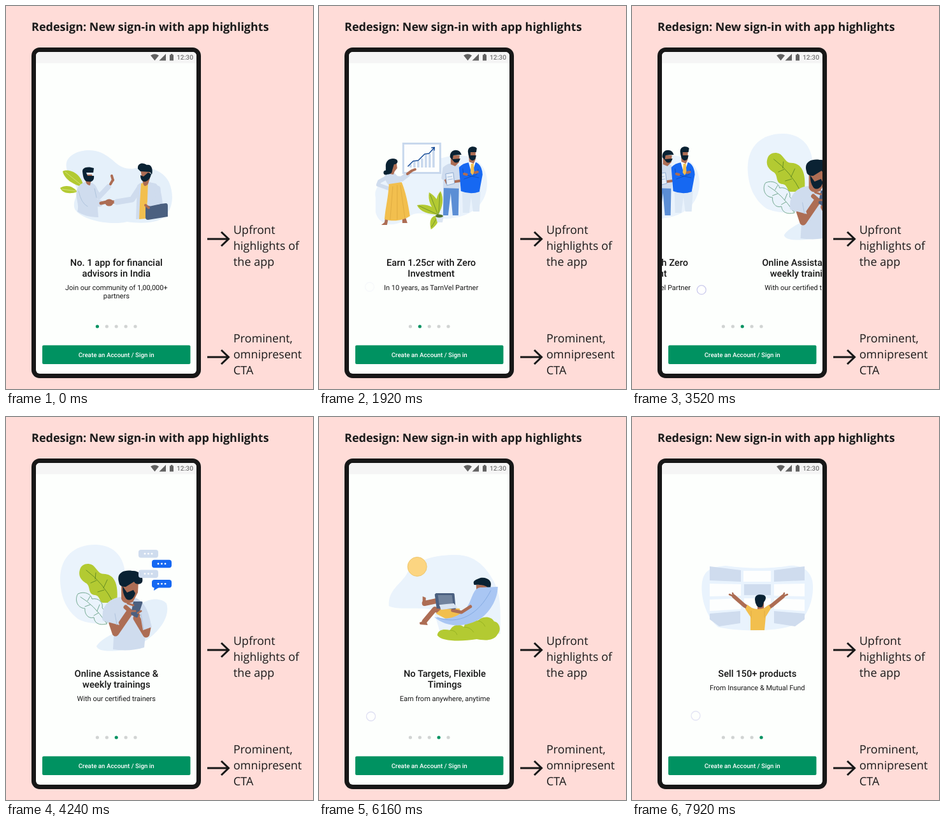
An HTML page for the animation above (8000 ms loop, 482x600 px).

```html
<!DOCTYPE html>
<html lang="en">
<head>
<meta charset="utf-8">
<title>Sign-in with app highlights</title>
<style>
html, body { margin: 0; width: 100%; height: 100%; overflow: hidden; background: #ffdcd8; }
svg { display: block; width: 482px; height: 600px; text-rendering: geometricPrecision; }
.note { font: 18px "Open Sans", sans-serif; fill: #1b1b1b; }
.title { font-weight: 700; }
.head, .sub, .cta, .clock { font-family: Roboto, sans-serif; text-anchor: middle; fill: #161616; }
.head { font-size: 14.7px; font-weight: 500; }
.sub { font-size: 11px; }
.cta { font-size: 9.75px; font-weight: 500; fill: #fff; }
.clock { font-size: 10.3px; font-weight: 500; fill: #757575; }
.blob { fill: #eaf3fc; }
.pale { fill: #cfdcee; }
.dark { fill: #0a2233; }
.skin { fill: #ad6d54; }
.gold { fill: #f2bf4e; }
.leaf { fill: #b3ca32; }
.blue { fill: #1668f2; }
.white { fill: #fdfefe; }
.slate { fill: #4b6080; }
.line { fill: none; stroke-linecap: round; stroke-linejoin: round; }
.limb { stroke: #ad6d54; }
.sleeve { stroke: #cfdcee; }
</style>
</head>
<body>
<svg viewBox="0 0 482 600">
  <defs><clipPath id="screen"><rect x="47" y="72" width="252" height="504" rx="6"/></clipPath></defs>
  <rect width="482" height="600" fill="#ffdcd8"/>
  <text class="note title" x="40" y="39">Redesign: New sign-in with app highlights</text>
  <g id="notes"></g>
  <rect x="40" y="65" width="266" height="518" rx="13" fill="#171717"/>
  <g clip-path="url(#screen)">
    <rect x="47" y="72" width="252" height="504" fill="#fdfffd"/>
    <rect x="47" y="72" width="252" height="17.5" fill="#f5f5f5"/>
    <g fill="#616161">
      <path d="M227 77.5Q233.500 73 240 77.500L233.500 85.500Z"/>
      <path d="M251 75V85.500H240.500Z"/>
      <path d="M257 76.500h1.800v-1.500h2.600v1.500H263V85.500h-6Z"/>
    </g>
    <text class="clock" x="281" y="84">12:30</text>

    <g class="slide"><g>
      <path class="blob" style="fill:#e5f0fa" d="M95 245C100 228 130 221 150 230C174 242 174 255 198 255C222 250 246 256 256 276C265 298 261 318 249 330C237 341 210 341 190 338C168 344 119 337 108 318C103 304 116 296 110 283C104 270 92 259 95 245Z"/>
      <path class="leaf" d="M89 259C99 254 119 262 122 284C106 280 92 272 89 259ZM85 285C94 279 106 282 112 291C101 295 89 294 85 285Z"/>
      <path class="line" stroke="#dce789" stroke-width=".8" d="M93 260L119 281M88 287L110 290"/>
      <path class="pale" d="M111 289C114 279 123 274 132 276C143 279 146 289 143 303L145 331C131 331 119 327 112 322C116 311 108 300 111 289Z"/>
      <path class="skin" d="M124 264h11l1 7-3 5-1 5q-6 0-7-7Z"/>
      <path class="dark" d="M120 259C120 252 130 251 138 254L137 261L126 261L128 266L138 266C139 274 134 276 130 275C122 276 121 267 120 259Z"/>
      <path class="line sleeve" stroke-width="8" d="M139 288L146 299L161 283"/>
      <path class="line limb" stroke-width="4" d="M164 279L168 272M166 266L168 273"/>
      <path class="line sleeve" stroke-width="11" d="M119 288L127 307L147 309"/>
      <path class="line" stroke="#a8bed9" stroke-width=".8" d="M114 290Q118 309 128 314M139 286L142 300"/>
      <path class="line limb" stroke-width="5" d="M149 309L158 307L169 307"/>
      <ellipse class="skin" cx="162" cy="308" rx="6.500" ry="5.500"/>
      <path class="line sleeve" stroke-width="9" d="M174 307L198 303L211 283"/>
      <path class="pale" d="M206 281Q212 275 220 275L235 278Q244 285 246 311L241 331L204 334Z"/>
      <path class="gold" d="M212 278L223 275L221 333L209 334Q210 305 212 278Z"/>
      <path class="skin" d="M211 256h15v14l-3 9q-6 7-8-2Z"/>
      <path class="dark" d="M207 255C206 245 216 245 221 249C229 247 231 257 229 264L226 260L211 259Z"/>
      <path class="dark" d="M211 265L216 267L223 261L228 263C227 271 221 276 216 275Q211 273 211 265Z"/>
      <path class="slate" d="M219 313L251 309Q254 309 254 313V330L223 335Q219 335 219 331Z"/>
      <path class="line sleeve" stroke-width="9" d="M238 286L240 306L226 309"/>
      <path class="line limb" stroke-width="4" d="M219 312L224 316"/>
    </g></g>

    <g class="slide"><g transform="translate(6)">
      <path class="blob" d="M80 300C76 283 94 269 111 270C144 259 153 241 185 238C224 226 254 242 255 274C257 309 231 329 201 332C177 339 158 317 135 328C113 350 85 345 80 323Z"/>
      <rect x="123.500" y="215.500" width="58" height="46" fill="#fdfefe" stroke="#c8d8ed" stroke-width="3"/>
      <path stroke="#c8d8ed" stroke-width="3.500" d="M135 253v-5M141 253v-9M147 253v-10M153 253v-14M159 253v-20M165 253v-21M171 253v-28"/>
      <path class="line" stroke="#174c98" stroke-width="1.500" d="M131 251L139 243L147 242L157 232L164 231L172 222M168 222L172.500 221.500L172 226"/>
      <path class="line sleeve" stroke-width="8" d="M109 270L121 271L130 264"/>
      <path class="line limb" stroke-width="4" d="M130 263L137 258L142 256"/>
      <path class="pale" d="M94 267Q99 259 110 262L118 270L120 279L102 282Q96 277 94 267Z"/>
      <path class="line sleeve" stroke-width="6" d="M97 269L86 275L84 280L101 286"/>
      <path class="skin" d="M102 246h11l1 8-4 5-2 5-6-1Z"/>
      <path class="dark" d="M96 252C95 241 105 237 112 240C117 243 114 248 109 248L106 258C106 264 98 265 96 262Z"/>
      <circle class="dark" cx="96" cy="261" r="3.500"/>
      <path class="skin" d="M95 333h5l-2 10h-9l5-4ZM122 331h5l3 9h-8Z"/>
      <path class="gold" d="M101 279L121 276C127 290 131 309 134 329C122 337 106 338 94 334C96 313 100 299 101 279Z"/>
      <path class="line" stroke="#d8a53d" stroke-width=".7" d="M107 283L103 334M114 281L114 334M119 281L126 332"/>
      <path fill="#5b8ed5" d="M187 279H211L210 328H201L198 293L194 328H186Z"/>
      <path class="pale" d="M186 253Q193 245 206 246L214 252L212 286L186 285Z"/>
      <path class="skin" d="M198 234h14l-1 11-6 6-7-3Z"/>
      <path class="dark" d="M197 237C196 225 208 223 213 229L215 233L202 234L201 240L213 239Q211 247 204 245Z"/>
      <path class="line limb" stroke-width="4" d="M188 268L192 277L212 274"/>
      <path class="line sleeve" stroke-width="7" d="M189 255L187 269"/>
      <path fill="#e8f0fa" stroke="#8fadd3" d="M190 263L202 261L204 278L192 281Z"/>
      <path class="line" stroke="#8fadd3" stroke-width=".8" d="M193 268l7-1M194 272l7-1"/>
      <path fill="#dce8f5" d="M216 289H245L243 322H233L230 299L227 324H217Z"/>
      <path class="blue" d="M211 253Q217 246 227 245H238Q247 249 248 264L243 291Q229 296 214 290Z"/>
      <path class="white" d="M226 245h11l-6 18Z"/>
      <path class="gold" d="M230 247h4l1 14-3 4-3-4Z"/>
      <path class="skin" d="M226 227h11v13l-3 7-7-3Z"/>
      <path class="dark" d="M225 228C225 218 237 219 239 223L238 229L229 229L229 234L238 234Q237 243 231 242Q226 240 225 228Z"/>
      <path class="line" stroke="#0d50c2" stroke-width="1" d="M217 255L218 264L242 269M241 256L239 264L219 271"/>
      <path class="line limb" stroke-width="4" d="M219 263l4 1M236 261l4-1"/>
      <path class="leaf" d="M179 327C163 326 150 323 145 312C160 309 174 314 179 327ZM179 325C166 317 162 304 164 292C176 299 183 310 179 325ZM179 326C173 312 174 299 182 290C188 302 185 315 179 326ZM179 328C166 328 164 337 167 350C176 344 180 337 179 328Z"/>
      <path class="line" stroke="#64862b" stroke-width=".8" d="M148 313L178 327L166 296M181 294L179 327L168 346"/>
      <path fill="#dce6f2" d="M174 329h13l-2 10h-8Z"/>
      <ellipse cx="180" cy="329" rx="6" ry="2.500" fill="#55752c"/>
    </g></g>

    <g class="slide"><g transform="translate(62)">
      <path class="blob" d="M23 256C22 218 47 199 80 200C108 201 125 220 125 250L121 312C101 327 71 326 52 317C34 304 24 284 23 256Z"/>
      <path class="blob" style="fill:#e5f0fa" d="M80 359C92 340 124 339 136 310C147 286 177 279 190 292C199 320 161 358 123 365Q83 370 80 359Z"/>
      <path class="leaf" d="M54 239C57 228 72 227 78 236C84 243 85 246 94 246C109 248 115 263 112 291H91C84 291 87 281 78 279C65 278 72 264 63 260Q50 252 54 239Z"/>
      <path class="line" stroke="#55811f" stroke-width=".8" d="M64 240Q91 260 107 292M78 254l1-10M80 256l-9 4M91 268l6-13M92 271l-10 3"/>
      <path class="line" stroke="#72a890" stroke-width="1" d="M96 324C84 327 77 323 76 314C66 317 61 307 62 300C48 299 46 284 51 277C62 272 72 278 73 285C84 283 91 291 89 299Q100 308 96 324ZM55 282Q76 294 95 322M66 288l4-7M70 294l-8 3M81 304l4-10M83 307l-7 4"/>
      <path class="pale" d="M90 306C92 290 108 282 120 282H137C154 286 162 302 166 327L157 340L155 361Q132 368 106 364L108 328L89 317Z"/>
      <path class="skin" d="M119 258h27l-1 17-8 15q-14 5-18-5Z"/>
      <path class="dark" d="M115 258C111 243 125 239 136 241C147 240 154 249 152 258C151 262 142 264 139 258L126 266Q116 267 115 258Z"/>
      <path class="dark" d="M121 265L128 275L138 271L141 276C139 285 131 290 126 284Q121 277 121 265Z"/>
      <path class="line limb" stroke-width="11" d="M105 323L110 338L132 306"/>
      <path class="line limb" stroke-width="11" d="M160 330L158 340L143 315"/>
      <path class="pale" d="M90 305Q95 294 106 294L116 326L90 319ZM146 294Q158 297 167 329L153 334Z"/>
      <path class="line" stroke="#a7bdd9" stroke-width=".8" d="M109 308L112 325M150 309L154 333"/>
      <path class="line limb" stroke-width="7" d="M126 298L135 306L145 311"/>
      <path class="slate" d="M138 289h13q2 0 1 3l-7 21q-1 2-3 1l-8-5Z"/>
      <path class="line limb" stroke-width="3" d="M129 292L138 295M134 304L141 304M145 307L150 304"/>
      <g id="chat"></g>
      <path class="blue" d="M171 266L170 272L178 267Z"/>
    </g></g>

    <g class="slide"><g transform="translate(-24.500)">
      <path class="blob" d="M110 291C111 269 132 259 139 244C154 222 185 216 215 216C247 216 264 237 276 260C287 282 285 309 285 340L190 336L180 302C156 297 122 303 110 296Z"/>
      <circle cx="154.500" cy="234.500" r="15" fill="#fcd581" stroke="#efc66a"/>
      <path class="leaf" d="M186 342C187 332 198 332 206 334C211 324 222 324 228 329C230 316 244 318 250 319C257 311 271 312 275 320C284 322 287 333 281 340C275 352 258 350 248 348C224 352 193 352 186 342Z"/>
      <path class="line" stroke="#95b021" stroke-width=".9" d="M206 334Q215 334 217 341M228 329Q238 329 243 337M250 319Q258 321 261 328"/>
      <path class="skin" d="M247 263h21l-5 15-15 3Z"/>
      <path class="dark" d="M244 263C240 256 249 254 254 252C264 250 272 257 270 264L269 270Q261 261 244 263Z"/>
      <path class="line limb" stroke-width="8" d="M209 306L185 288L166 292M205 311L182 301L166 320"/>
      <path class="skin" d="M168 283l-5-2v13l5 1ZM168 318l-10 4 1 3 12 1Z"/>
      <path class="gold" d="M194 299L221 300L225 316L201 317L184 308Z"/>
      <path d="M181 313C202 320 226 313 236 292C243 277 244 266 257 267L281 266C281 283 271 303 255 315C234 329 202 332 181 313Z" fill="#a9c6f3"/>
      <path class="line" stroke="#82a8e0" stroke-width=".9" d="M186 314C219 326 250 311 270 272"/>
      <path class="line limb" stroke-width="5" d="M238 297L224 306L210 303"/>
      <path class="slate" d="M184 276h27q2 0 2 2l2 23-30-1-3-22Z"/>
      <path fill="#71839d" d="M187 279h22l2 15-22-1Z"/>
      <path fill="#d9e4f1" d="M189 294L212 292L218 299L192 302Z"/>
    </g></g>

    <g class="slide"><g transform="translate(-23.500)">
      <path class="blob" style="fill:#e9f3fd" d="M110 259C113 241 123 235 147 233C184 238 216 238 247 233C272 231 284 246 284 265C285 287 276 308 263 323C231 337 170 337 135 329C117 314 107 283 110 259Z"/>
      <path class="pale" d="M122 234L171 240V258L122 256ZM271 234L223 240V258L271 256ZM176 262h42v17h-42ZM122 308L170 304V323L137 328L122 317ZM271 308L223 304V323L256 328L271 317Z"/>
      <path class="white" d="M175 241h43v17h-43ZM122 261L171 262V280L122 281ZM271 261L223 262V280L271 281ZM122 286L171 284V301L122 304ZM271 286L223 284V301L271 304ZM176 284h42v17h-42Z"/>
      <path class="line limb" stroke-width="6" d="M188 303L176 295L160 281M208 303L220 295L237 281"/>
      <path class="line limb" stroke-width="2.500" d="M162 282L153 278M160 281L158 276M235 282L244 278M237 281L239 276"/>
      <path class="skin" d="M197 289h10v12h-10Z"/>
      <path class="gold" d="M181 294L188 299Q198 303 208 299L215 294L218 300L210 313L208 334H186L186 313L178 301Z"/>
      <path class="line" stroke="#d9a742" stroke-width=".7" d="M187 304L187 314M208 304L208 314"/>
      <path class="dark" d="M193 286C193 277 202 278 207 279C212 281 210 287 207 290L205 297Q200 300 196 296Q193 291 193 286Z"/>
    </g></g>

    <g id="dots"></g>
    <rect x="57" y="531.500" width="232.500" height="29.500" rx="2" fill="#009261"/>
    <text class="cta" x="173.200" y="550">Create an Account / Sign in</text>
    <circle id="touch" r="7" fill="#fff" fill-opacity=".75" stroke="#cbcbec" stroke-width="1.300"/>
  </g>
</svg>
<script>
const NS = "http://www.w3.org/2000/svg";
const PAGE = 252, LOOP = 8000, LAST = 7920, SETTLE = 400, GRIP_X = 264.5;
const $ = id => document.getElementById(id);

function add(parent, tag, attrs, text = "") {
  const node = document.createElementNS(NS, tag);
  for (const key in attrs) node.setAttribute(key, attrs[key]);
  node.textContent = text;
  parent.appendChild(node);
  return node;
}

function addNote(y, lines) {
  lines.forEach((line, i) => add($("notes"), "text", { class: "note", x: 357, y: y + 25 * i }, line));
  add($("notes"), "path", {
    d: `M316 ${y + 8}H349M338 ${y - 3}L349.5 ${y + 8}L338 ${y + 19}`,
    fill: "none", stroke: "#171717", "stroke-width": 3
  });
}
addNote(357, ["Upfront", "highlights of", "the app"]);
addNote(527, ["Prominent,", "omnipresent", "CTA"].map(s => s));
// The lower arrow sits one line further down its note.
$("notes").lastChild.setAttribute("transform", "translate(0 15)");

const captions = [
  [["No. 1 app for financial", "advisors in India"], ["Join our community of 1,00,000+", "partners"]],
  [["Earn 1.25cr with Zero", "Investment"], ["In 10 years, as TarnVel Partner"]],
  [["Online Assistance &", "weekly trainings"], ["With our certified trainers"]],
  [["No Targets, Flexible", "Timings"], ["Earn from anywhere, anytime"]],
  [["Sell 150+ products"], ["From Insurance & Mutual Fund"]]
];
const slides = [...document.querySelectorAll(".slide")];
slides.forEach((slide, i) => {
  const [head, sub] = captions[i];
  head.forEach((s, k) => add(slide, "text", { class: "head", x: 173.3, y: 407 + 17.3 * k }, s));
  const top = 410.7 + 17.3 * head.length;
  sub.forEach((s, k) => add(slide, "text", { class: "sub", x: 173.3, y: top + 13 * k }, s));
});

for (let i = 0; i < 4; i++) {
  const x = i % 2 ? 167 : 146, y = 208 + 15.7 * i;
  add($("chat"), "rect", { class: i % 2 ? "blue" : "pale", x, y, width: 31, height: 12.5, rx: 4 });
  for (let k = 0; k < 3; k++)
    add($("chat"), "circle", { class: "white", cx: x + 10 + 5.5 * k, cy: y + 6.2, r: 1.4 });
}

const dots = slides.map((_, i) => add($("dots"), "circle", { cx: 143.4 + 14.9 * i, cy: 502, r: 2.6 }));

// Each swipe: press and release times, dragged distance, finger height at both ends.
const swipes = [
  { down: 780, up: 1660, drag: 185, y0: 428, y1: 440 },
  { down: 2598, up: 3680, drag: 165, y0: 424, y1: 446 },
  { down: 4542, up: 6043, drag: 183, y0: 472, y1: 469 },
  { down: 6701, up: 7778, drag: 164.5, y0: 458, y1: 468 }
];
const clamp = v => Math.max(0, Math.min(1, v));
const smooth = p => p * p * (3 - 2 * p);

function render(t) {
  let scroll = 0, finger = { x: 0, y: 0, alpha: 0 };
  for (const s of swipes) {
    if (t < s.down) break;
    const p = smooth(clamp((t - s.down) / (s.up - s.down)));
    const left = (1 - clamp((t - s.up) / SETTLE)) ** 3;
    const drag = s.drag * p;
    scroll += t < s.up ? drag : PAGE - (PAGE - s.drag) * left;
    finger = {
      x: GRIP_X - drag,
      y: s.y0 + (s.y1 - s.y0) * p,
      alpha: clamp((t - s.down) / 100) * (1 - clamp((t - s.up) / 300))
    };
  }
  slides.forEach((slide, i) => slide.setAttribute("transform", `translate(${(PAGE * i - scroll).toFixed(2)})`));
  const page = Math.round(scroll / PAGE);
  dots.forEach((dot, i) => dot.setAttribute("fill", i === page ? "#009261" : "#d1d4d3"));
  const touch = $("touch");
  touch.setAttribute("cx", finger.x);
  touch.setAttribute("cy", finger.y);
  touch.setAttribute("opacity", finger.alpha);
}

const start = performance.now();
function tick() {
  render(Math.min((performance.now() - start) % LOOP, LAST));
  requestAnimationFrame(tick);
}
render(0);
requestAnimationFrame(tick);
</script>
</body>
</html>
```
